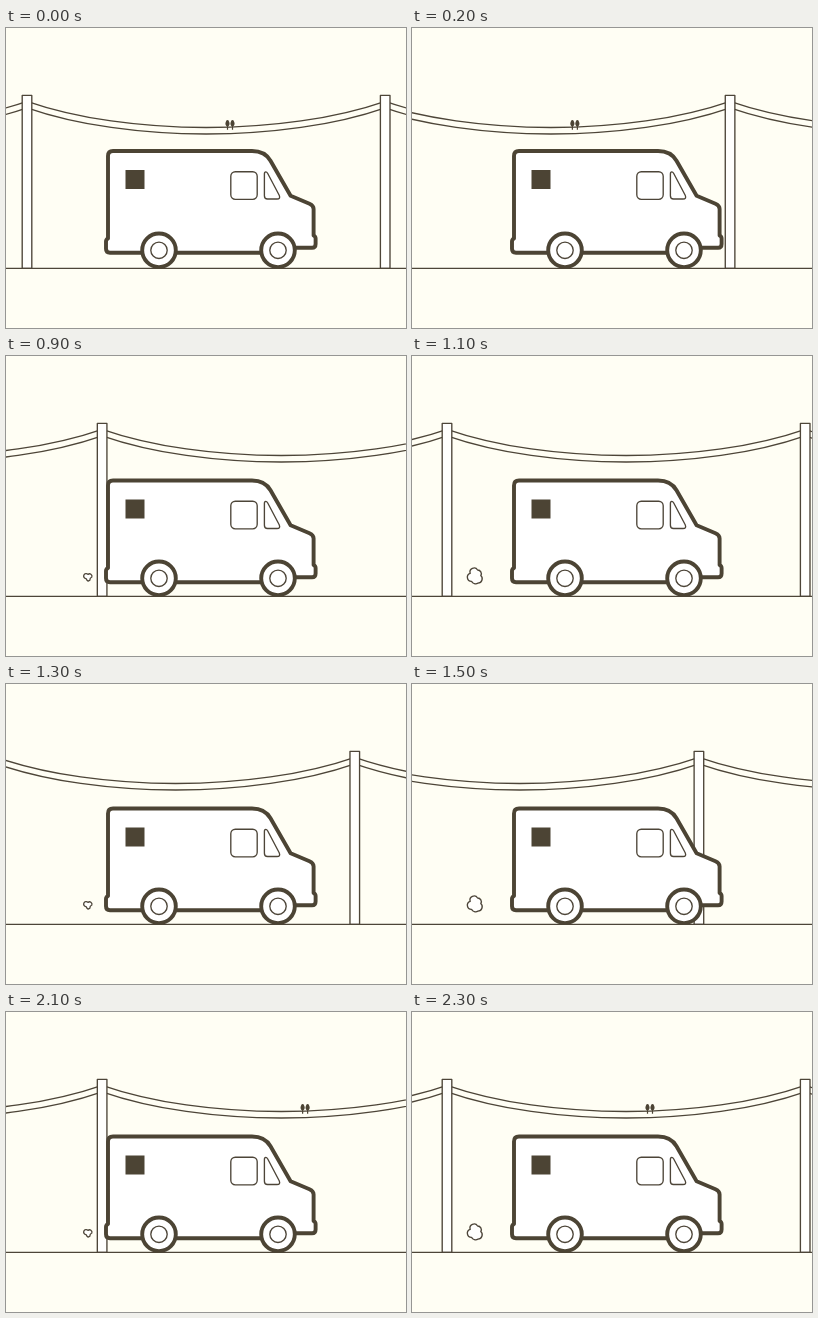
Write an HTML page that moves like this. It is 400x300 px and loops after 2400 ms.

```html
<!DOCTYPE html>
<html lang="en">
<head>
<meta charset="utf-8">
<title>Van on the road</title>
<style>
  html, body { margin: 0; width: 100%; height: 100%; overflow: hidden; background: #fffef4; }
  svg { display: block; width: 100vw; height: 100vh; }
  .thin { fill: none; stroke: #4d4538; stroke-width: 1.35; stroke-linejoin: round; }
  .bold { fill: #fff; stroke: #4c4434; stroke-width: 3.9; stroke-linejoin: round; }
  .white { fill: #fffffd; }
  .ink { fill: #4c4434; }
</style>
</head>
<body>
<svg viewBox="0 0 400 300">
  <g id="line"></g>
  <path class="thin" d="M0 240.4H400"/>
  <g id="puffs">
    <path class="thin white" d="M82 218.4A2.4 2.4 0 0 1 85.8 221Q83.8 222 83.8 224.3Q81.6 226.2 80 222.6A2.5 2.5 0 1 1 82 218.4Z"/>
    <use href="#cloud" transform="translate(25.5 55) scale(.75)"/>
    <path id="cloud" class="thin white" vector-effect="non-scaling-stroke"
      d="M58.2 217.4A4.1 4.1 0 0 1 65.6 214A3.7 3.7 0 0 1 68.8 219.6A4.4 4.4 0 0 1 66 227.2A5 5 0 0 1 59.5 225.4A4.1 4.1 0 0 1 58.2 217.4Z"/>
  </g>
  <g id="body">
    <path class="bold" d="M107 124.5H246Q259 124.5 264.5 134.3L284.6 169.3L303.5 177.2Q307.6 179 307.6 182.5V209
      Q309.6 210 309.6 212V217.4Q309.6 221.2 306 221.2H290L272 226.2H104Q100 226.2 100 222.2V215Q100 213 102 212V129.5Q102 124.5 107 124.5Z"/>
    <rect class="thin" x="224.8" y="145.2" width="26.4" height="27.6" rx="4.5"/>
    <path class="thin" d="M258.4 147.5Q258.4 145.3 259.8 145.3Q260.8 145.3 261.6 146.8L273.2 168.8Q274.8 172.5 271 172.5H261.5Q258.4 172.5 258.4 169.3Z"/>
    <rect class="ink" x="119.5" y="143.5" width="19" height="19"/>
  </g>
  <g id="wheels"></g>
</svg>
<script>
const byId = id => document.getElementById(id);
const SPAN = 358.2, STEP = 100, STEPS = 12;

const wire = (x, y) => `<path class="thin" d="M${x} ${y}c${SPAN * .28} 34.9 ${SPAN * .72} 34.9 ${SPAN} 0"/>`;
const pole = x => `<rect class="thin white" x="${x - 4.8}" y="67.4" width="9.6" height="173"/>`;
const bird = x => `<path class="ink" d="M${x} 92c1.4 0 1.2 1.2 1.9 2.4c.6 1.7-.2 3-1.3 4.1v3.3h-1.2v-3.3c-1.1-1.1-1.9-2.4-1.3-4.1c.7-1.2.5-2.4 1.9-2.4z"/>`;
const wheel = x => `<circle class="bold" cx="${x}" cy="222.3" r="16.8"/><circle class="thin" cx="${x}" cy="222.3" r="8.2"/>`;

const spots = [-2, -1, 0, 1, 2].map(k => k * SPAN);
byId('line').innerHTML = spots.map(x => wire(x, 73.3) + wire(x, 79.8)).join('')
  + spots.map(pole).join('') + `<g id="birds">${bird(-2.5)}${bird(2.5)}</g>`;
byId('wheels').innerHTML = wheel(153) + wheel(272);

const shift = (id, x, y) => byId(id).setAttribute('transform', `translate(${x} ${y})`);
const puffs = [...byId('puffs').children];

function draw(ms) {
  const tick = Math.floor(ms / STEP) % (2 * STEPS);
  const lap = Math.floor(tick / STEPS);
  // Gentle ease across each lap; the step into the next lap is shorter.
  const u = (tick % STEPS) / (STEPS - 1);
  const travel = 344.2 * u - 1.6 * Math.sin(2 * Math.PI * u);
  shift('line', 379.2 - travel, 0);
  shift('birds', 203 - (lap ? 0 : SPAN), 0);
  shift('body', 0, tick % 2 ? 0 : -1.5);
  puffs.forEach((p, i) => p.style.display = tick % 4 === i + 1 ? '' : 'none');
}

let start;
function loop(now) {
  start ??= now;
  draw(now - start);
  requestAnimationFrame(loop);
}
draw(0);
requestAnimationFrame(loop);
</script>
</body>
</html>
```
